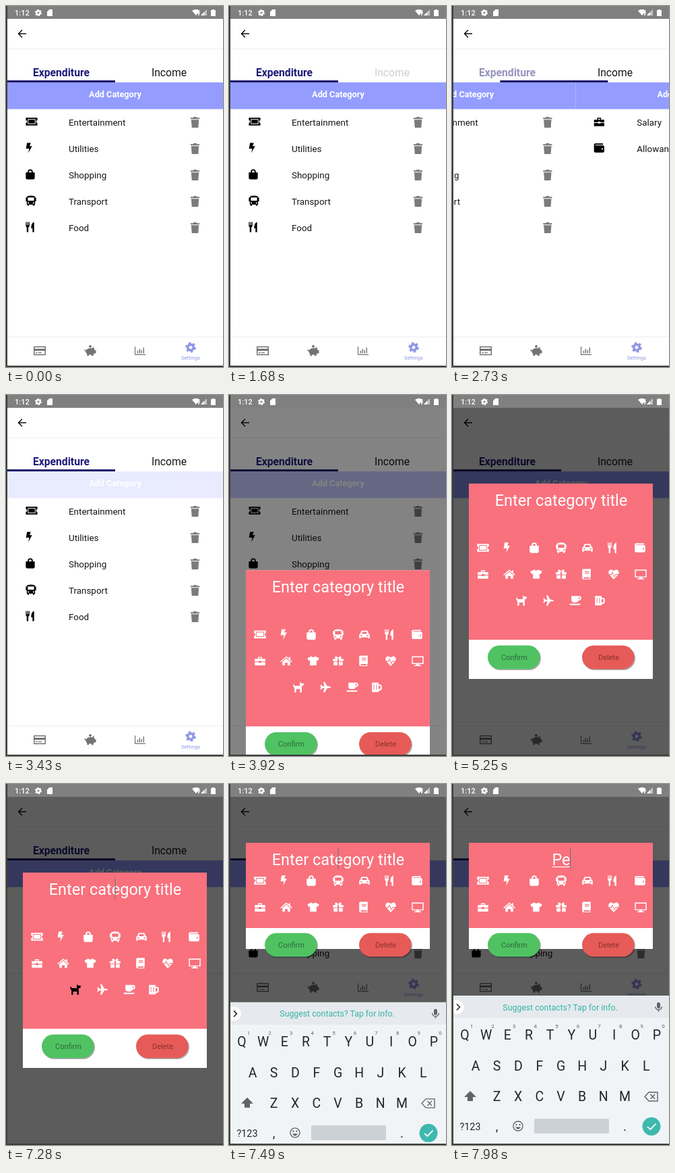
An HTML page for the animation above (8000 ms loop, 322 by 534 pixels).

```html
<!DOCTYPE html>
<html lang="en">
<head>
<meta charset="utf-8">
<style>
html, body { margin: 0; width: 100%; height: 100%; overflow: hidden; background: #fff; }
svg { display: block; font-family: Roboto, sans-serif; }
text { white-space: pre; }
</style>
</head>
<body>
<svg id="stage" width="322" height="534" viewBox="0 0 322 534"></svg>
<script>
// Icons are centred on 0,0 and about 16 units wide.
const icons = {
  ticket: 'M-9-6H9V-2A2 2 0 0 0 9 2V6H-9V2A2 2 0 0 0-9-2ZM-6-4V4H6V-4ZM-5-3H5V3H-5Z',
  bolt: 'M-3-8H3L1-3H5L-1 8L.5 1H-4.5Z',
  bag: 'M-7-3H-4V-4A4 4 0 0 1 4-4V-3H7V5.5A2.5 2.5 0 0 1 4.5 8H-4.5A2.5 2.5 0 0 1-7 5.5ZM-2-3H2V-4A2 2 0 0 0-2-4Z',
  bus: 'M-6-7Q0-9 6-7V-5H8V1H6.5V6H5.5V8H3V6H-3V8H-5.5V6H-6.5V1H-8V-5H-6ZM-4.8-5V0H4.8V-5ZM-5 2.5V4.5H-3V2.5ZM3 2.5V4.5H5V2.5Z',
  car: 'M-8 0L-6.5-1-5-5Q-4.5-6-3-6H3Q4.5-6 5-5L6.5-1 8 0V6H5.5V4.5H-5.5V6H-8ZM-4-1H4L3-4H-3ZM-6 1V2.6H-3.5V1ZM3.5 1V2.6H6V1Z',
  fork: 'M-7-8h1.2v5h1v-5h1.2v5h1v-5H-1.2V-2Q-1.2 0-3 .5V8H-5.5V.5Q-7 0-7-2ZM6-8V8H3.5V2H1.5Q1-6 6-8Z',
  wallet: 'M-6-7H6V-5H-6V-4H6Q8-4 8-2V5Q8 7 6 7H-6Q-8 7-8 5V-5Q-8-7-6-7ZM4 .5V2.5H6V.5Z',
  work: 'M-8-3H-3V-6H3V-3H8V1H2V0H-2V1H-8ZM-1.5-3H1.5V-4.5H-1.5ZM-8 2H-2V3H2V2H8V7H-8Z',
  home: 'M0-7L4-3.5V-6H6V-1.7L9 1 8 2 0-5-8 2-9 1ZM0-3.5L6 1.5V7H2V3H-2V7H-6V1.5Z',
  shirt: 'M-3-7Q0-4 3-7L9-4 7 0 5-1V7H-5V-1L-7 0-9-4Z',
  gift: 'M-8-3H-1V.5H-8ZM1-3H8V.5H1ZM-7 1.5H-1V7H-7ZM1 1.5H7V7H1ZM0-3.5Q-5-2-5-5Q-4-9 0-4.5Q4-9 5-5Q5-2 0-3.5Z',
  book: 'M-5-8H6V5H5V7H6V8H-5Q-7 8-7 6V-6Q-7-8-5-8ZM-4.5 5V7H4V5ZM-3-4.5H3.5V-3.2H-3ZM-3-2H3.5V-.7H-3Z',
  heart: 'M0 8L-7.5 0Q-9-4-6-6.5Q-3-8 0-5Q3-8 6-6.5Q9-4 7.5 0ZM-7 0H-4L-2-4 1 3 2.5 0H7V1H3L1 5.5-2-1.5-3.4 1.2H-6.5Z',
  screen: 'M-9-7H9V5H2V6.5H5V8H-5V6.5H-2V5H-9ZM-7.5-5.5V3.5H7.5V-5.5Z',
  dog: 'M2.5-8L4.5-6H8V-3.5Q8-2 6-2H5V8H2.5V3H-3.5V8H-6V1Q-8 0-8-4H-6.5Q-6.5-2-5-2H2Z',
  plane: 'M8.5 0Q8 1.3 5 1.4H3L-1 8H-3.2L-1.5 1.4H-4.5L-6 3.4H-8L-6.8 0-8-3.4H-6L-4.5-1.4H-1.5L-3.2-8H-1L3-1.4H5Q8-1.3 8.5 0Z',
  cup: 'M-6-7H6Q9-7 9-3.5Q9 0 5 0Q4.5 3-1 3Q-6 3-6-1ZM5-5V-2Q7-2 7-3.5Q7-5 5-5ZM-9 5H8Q8 7 6 7H-7Q-9 7-9 5Z',
  mug: 'M-7-7H3V-4H5Q8-4 8-1V2Q8 4 6 5L3 6V7.5H-7ZM-4.5-4V4H-3.5V-4ZM-.5-4V4H.5V-4ZM3-2V3.5L5.8 2V-2Z',
  trash: 'M-7-7H-3L-2-8.5H2L3-7H7V-5H-7ZM-6-4H6L5 8.5H-5Z',
  card: 'M-9-6.5H9V6.5H-9ZM-7.5-5V-3H7.5V-5ZM-7.5 0V5H7.5V0ZM-6 2.2H-3V3.6H-6ZM-2 2.2H3V3.6H-2Z',
  pig: 'M-5.5-2Q-2-5 3-4L6-6V-3Q7-2 7.5-.5H9V4H6.5L5 5.5V8H2V6H-2V8H-5V5Q-7 3-7 1Q-9 1-9-2H-8Q-8-.5-6.8-.5ZM-1-5A2 2 0 1 1 1-5Z',
  chart: 'M-8.5-6.5H-7.2V5.2H8.5V6.5H-8.5ZM-4.5 0H-3V4H-4.5ZM-1.5-3H0V4H-1.5ZM1.5-1H3V4H1.5ZM4.8-5H6.3V4H4.8Z',
};

const icon = (name, x, y, fill, scale = 1, attrs = '') =>
  `<path d="${icons[name]}" transform="translate(${x} ${y}) scale(${scale})" fill="${fill}" fill-rule="evenodd" ${attrs}/>`;
const rect = (x, y, w, h, fill, attrs = '') =>
  `<rect x="${x}" y="${y}" width="${w}" height="${h}" fill="${fill}" ${attrs}/>`;
const text = (str, x, y, size, fill, attrs = '') =>
  `<text x="${x}" y="${y}" font-size="${size}" fill="${fill}" ${attrs}>${str}</text>`;
const line = (d, color, width = 1.5) =>
  `<path d="${d}" fill="none" stroke="${color}" stroke-width="${width}"/>`;
const gear = (x, y, color, s = 1) =>
  `<g transform="translate(${x} ${y}) scale(${s})" fill="none" stroke="${color}">
    <circle r="4.2" stroke-width="3.6"/><circle r="6.6" stroke-width="2.4" stroke-dasharray="3.46 3.45"/></g>`;
const mid = 'text-anchor="middle"';

const page = (x, rows) => `<g transform="translate(${x})">` + rows.map(([name, label, ix], i) => {
  const y = 172 + 39 * i;
  return icon(name, ix, y - 1, '#000', .95) + text(label, 93, y + 5, 13.4, '#151515') + icon('trash', 280.5, y, '#7b7b7b', .95);
}).join('') + `<g class="add">${rect(2, 113, 320, 39.5, '#949dff')}
  ${text('Add Category', 162, 135, 12.7, '#fff', mid + ' font-weight="700"')}</g></g>`;

const app = rect(2, 19, 320, 513, '#fff')
  + line('M30 41H18.5M24 35.5L18.5 41 24 46.5', '#111')
  + rect(2, 63, 320, 1, '#eee')
  + text('Expenditure', 82, 104, 15.7, '', mid + ' id="tabA"')
  + text('Income', 242, 104, 15.7, '', mid + ' id="tabB"')
  + '<g id="pages">' + page(0, [['ticket', 'Entertainment', 38], ['bolt', 'Utilities', 34], ['bag', 'Shopping', 36],
      ['bus', 'Transport', 37], ['fork', 'Food', 36]])
  + page(320, [['work', 'Salary', 37], ['wallet', 'Allowance', 37]]) + '</g>'
  + rect(2, 110, 160, 3, '#1b1768', 'id="marker"')
  + `<g id="nav">${rect(2, 490, 320, 44, '#fff')}${rect(2, 489, 320, 1, '#ececec')}
    ${icon('card', 50, 510, '#737373')}${icon('pig', 125, 510, '#737373', .95)}${icon('chart', 199, 510, '#737373', .95)}
    ${gear(274, 505, '#8f97e6')}${text('Settings', 274, 523, 7.7, '#8f97e6', mid)}</g>`;

const choices = [
  ['ticket bolt bag bus car fork wallet', [46, 81, 122, 162, 201, 238, 279]],
  ['work home shirt gift book heart screen', [46, 85, 125, 162, 200, 240, 280]],
  ['dog plane cup mug', [103, 143, 183, 219]],
].map(([names, xs], row) => `<g id="row${row}">` + names.split(' ').map((n, i) =>
  icon(n, xs[i], 39 * row, '#fff', .97, n === 'dog' ? 'id="dog"' : '')).join('') + '</g>').join('');

const pill = (x, label, fill, ink) =>
  rect(x + 1, -16, 78, 35, '#0005', 'rx="17.5"') + rect(x, -17.5, 77.5, 35, fill, 'rx="17.5"')
  + text(label, x + 39.5, 4, 11, ink, mid);

const modal = `<g id="modal">${rect(25, 0, 273, 289, '#fff', 'id="sheet"')}${rect(25, 0, 273, 231, '#f8717d', 'id="pink"')}
  ${text('', 162, 33, 23.5, '#fff', mid + ' id="title"')}
  ${rect(148.5, 35, 27, 1.2, '#fff', 'id="underline"')}${rect(161.5, 8, 1.2, 31, '#777', 'id="caret"')}
  <g id="choices">${choices}</g>
  <g id="buttons">${pill(53, 'Confirm', '#50c262', '#28683a')}${pill(193, 'Delete', '#e65b57', '#8b302f')}</g></g>`;

const ink = '#22262a', grey = '#5f6468';
const keyRow = (letters, x, y) => [...letters].map((c, i) => text(c, x + 31.65 * i, y + 7, 19.5, ink, mid)).join('');
const keyboard = `<g id="keyboard">${rect(2, 313, 320, 221, '#f1f4f7')}${rect(2, 313, 320, 33, '#e6eaee')}
  <path d="M2 320H8A10 10 0 0 1 8 340H2Z" fill="#fff"/>${line('M7 325.5L11.5 330 7 334.5', '#222')}
  ${text('Suggest contacts? Tap for info.', 160.5, 334.5, 12.3, '#35b3a6', mid)}
  ${rect(304, 323, 5, 9, grey, 'rx="2.5"')}${line('M301.5 329A5 5 0 0 0 311.5 329M306.5 334V337', grey, 1.3)}
  ${keyRow('QWERTYUIOP', 19, 371)}${keyRow('ASDFGHJKL', 35, 417)}${keyRow('ZXCVBNM', 66.5, 462)}
  ${[...'1234567890'].map((c, i) => text(c, 29 + 31.6 * i, 361, 8, grey, mid)).join('')}
  <path d="M27 454L36 463H31V469H23V463H18Z" fill="${grey}"/>
  ${line('M292 456H305V469H292L286 462.5ZM294.5 459L301 466M301 459L294.5 466', grey, 1.4)}
  ${text('?123', 27, 512, 14.4, ink, mid)}${text(',', 66.5, 513, 19, ink, mid)}${text('.', 256.5, 513, 19, ink, mid)}
  <circle cx="98" cy="506" r="7" fill="none" stroke="${grey}" stroke-width="1.4"/>
  <path d="M94 507.5H102Q98 514 94 507.5ZM94.5 503h2v2h-2zM99.5 503h2v2h-2z" fill="${grey}"/>
  ${rect(122, 495, 111, 22, '#ccd1d5', 'rx="2"')}
  <circle cx="296" cy="506.5" r="13.5" fill="#3db9ae"/>${line('M290 507L294.5 511 302.5 502.5', '#fff', 1.8)}</g>`;

const statusBar = rect(2, 0, 320, 19, '#808080') + text('1:12', 13, 14, 11, '#fff', 'font-weight="500"')
  + gear(48, 10, '#fff', .65)
  + `<path d="M64.5 5H69V15H61V8.5ZM276 7Q282 3 288 7L282 14ZM308 5H309V6H311V15H304V6H306V5Z" fill="#fff"/>
    <path d="M298 5V14H289Z" fill="#c4c4c4"/><path d="M294 9V14H289Z" fill="#fff"/>${line('M284 10H288M286 10V14', '#fff')}`;

document.getElementById('stage').innerHTML = app + rect(2, 19, 320, 513, '#000', 'id="shade"')
  + modal + keyboard + statusBar + rect(0, 0, 2, 534, '#3c3c3c') + rect(0, 532, 322, 2, '#3c3c3c');

const el = id => document.getElementById(id);
const set = (id, attrs) => { for (const k in attrs) el(id).setAttribute(k, attrs[k]); };
const move = (id, x, y) => set(id, { transform: `translate(${x} ${y})` });
const addButtons = document.querySelectorAll('.add');

function draw(now) {
  const t = Math.floor(now % 8000 / 70) * 70;
  const ramp = (a, b) => Math.min(1, Math.max(0, (t - a) / (b - a)));
  const easeOut = (a, b, power = 3) => 1 - (1 - ramp(a, b)) ** power;

  // Tabs
  const slide = easeOut(1780, 2170) - easeOut(2640, 3010);
  const onIncome = t >= 1890 && t < 2730;
  const style = active => ({ fill: active ? '#1f1b78' : '#151515', 'font-weight': active ? 700 : 400 });
  const press = (down, up) => t < down ? 1 : .2 + .8 * ramp(up, up + 210);
  set('tabA', { ...style(!onIncome), opacity: press(2590, 2660) });
  set('tabB', { ...style(onIncome), opacity: press(1680, 1780) });
  move('pages', -320 * slide, 0);
  move('marker', 160 * slide, 0);
  addButtons.forEach(b => b.setAttribute('opacity', press(3430, 3830)));

  // Dialog
  const open = easeOut(3800, 4200, 4);
  const compact = t >= 7490;
  set('shade', { opacity: .64 * open });
  move('modal', 0, (compact ? 87 : 131) + 534 * (1 - open));
  set('sheet', { height: compact ? 157 : 289 });
  set('pink', { height: compact ? 126 : 231 });
  move('choices', 0, compact ? 56 : 95);
  move('row1', 0, 0);
  set('row2', { visibility: compact ? 'hidden' : 'visible' });
  move('buttons', 0, compact ? 151 : 257);
  const picked = t >= 6020;
  set('dog', { fill: picked ? '#000' : '#fff', opacity: picked ? .3 + .7 * ramp(6020, 6300) : 1 - .7 * ramp(5740, 5880) });

  // Typing
  const typed = t >= 7910 ? 'Pe' : t >= 7770 ? 'P' : '';
  el('title').textContent = typed || 'Enter category title';
  const width = [0, 15, 27][typed.length];
  set('underline', { x: 162 - width / 2, width });
  set('caret', { x: 161.5 + width / 2, visibility: t >= 6930 ? 'visible' : 'hidden' });
  move('nav', 0, t >= 7140 ? -209 : 0);
  move('keyboard', 0, 221 * (1 - easeOut(7290, 7600)));
  requestAnimationFrame(() => draw(performance.now()));
}
draw(0);
</script>
</body>
</html>
```
